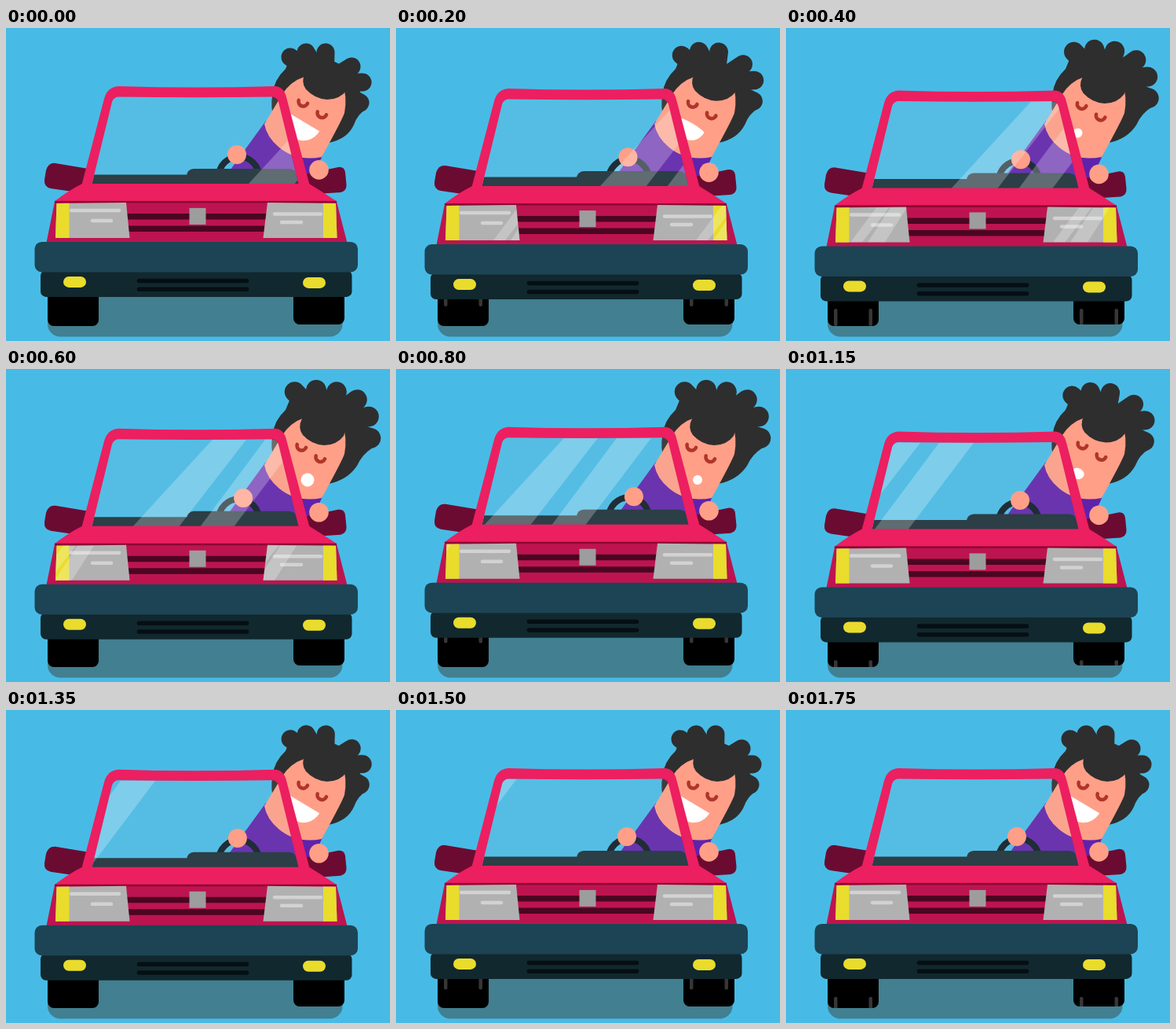
Recreate the animation shown at these times as an HTML page with a canvas. Size 489 by 398 pixels, loop 1.8 s.

```html
<!DOCTYPE html>
<html>
<head>
<meta charset="utf-8">
<style>
html, body { margin: 0; width: 100%; height: 100%; overflow: hidden; background: #47bbe6; }
canvas { display: block; }
</style>
</head>
<body>
<canvas id="stage" width="489" height="398"></canvas>
<script>
const c = document.getElementById('stage').getContext('2d');
const LOOP = 1800, STEP = 50;
const PINK = '#ec1f60', SKIN = '#ff9f88', HAIR = '#2e2e2e', YELLOW = '#e9dc2d', PURPLE = '#5f22ab';

const mix = (a, b, k) => a + (b - a) * k;

// Cosine ease from 0 to 1 between two times
function ramp(t, from, to) {
  const k = Math.min(1, Math.max(0, (t - from) / (to - from)));
  return (1 - Math.cos(Math.PI * k)) / 2;
}

function fill(d, color) {
  c.fillStyle = color;
  c.fill(new Path2D(d));
}

function box(x, y, w, h, r, color) {
  c.fillStyle = color;
  c.beginPath();
  c.roundRect(x, y, w, h, r);
  c.fill();
}

function disc(x, y, r, color) {
  c.fillStyle = color;
  c.beginPath();
  c.arc(x, y, r, 0, Math.PI * 2);
  c.fill();
}

function line(x1, y1, x2, y2, w, color) {
  c.strokeStyle = color;
  c.lineWidth = w;
  c.lineCap = 'round';
  c.beginPath();
  c.moveTo(x1, y1);
  c.lineTo(x2, y2);
  c.stroke();
}

// Slanted band of light: bottom edge a..b, top edge e..f
function band(a, b, y1, e, f, y2, shift) {
  c.fillStyle = 'rgba(255,255,255,0.24)';
  c.beginPath();
  c.moveTo(a + shift, y1);
  c.lineTo(b + shift, y1);
  c.lineTo(f + shift, y2);
  c.lineTo(e + shift, y2);
  c.fill();
}

const GLASS = 'M109 200 L135 94 Q137 88 143 87.5 Q241 89 339 87.5 Q345 88 347 94 L373 200 Z';
const FRAME = 'M96 201 L125 90 Q129 75 143 74 Q240 77 343 74 Q354 75 357 88 L387 201 Z ';
const LAMP_L = 'M64.5 223 L153 222 L157.5 267 L63 267 Z';
const LAMP_R = 'M333 222 L420 223 L421.5 267 L327.5 267 Z';

// Tuft tips: rest x, y and blown x, y
const TUFTS = [
  [362, 37, 367.5, 29], [382, 31, 395, 26.5], [407, 31, 421, 29],
  [440, 49, 447, 39], [454, 69, 462, 60.5], [451, 95, 464.5, 88]
];

function wheels(n) {
  const top = 307 + (6.25 * n) % 80.5;
  for (const [x, h] of [[53, 39], [366, 37]]) {
    box(x, 340, 65, h, [0, 0, 8, 8], '#000');
    c.save();
    c.beginPath();
    c.rect(x, 340, 65, h);
    c.clip();
    for (const dx of [8, 52.5]) box(x + dx, top, 4.5, 22, 2, '#363636');
    c.restore();
  }
}

function mouth(t) {
  const s = 1 - ramp(t, 100, 350) + ramp(t, 1100, 1350);
  const side = ramp(t, 400, 600) - ramp(t, 850, 1100);
  const r = 6 + 2.5 * (1 - Math.cos(2 * Math.PI * (t - 400) / 400)) / 2;
  const rx = mix(r, 23, s), up = mix(r, 0, s), down = mix(r, 24, s);
  c.save();
  c.translate(mix(mix(371.5, 384, side), 379.5, s), mix(mix(133.5, 141, side), 119.5, s));
  c.rotate(0.54);
  c.fillStyle = '#fff';
  c.beginPath();
  c.ellipse(0, 0, rx, down, 0, 0, Math.PI);
  c.ellipse(0, 0, rx, up, 0, Math.PI, Math.PI * 2);
  c.fill();
  c.restore();
}

function driver(t) {
  const u = ramp(t, 0, 550) - ramp(t, 850, 1400);

  fill('M331 118 L283 184 L300 205 L384 205 L403 162 Z', PURPLE);

  // Back hair
  for (const [x, y, bx, by] of TUFTS) {
    line(406, 70, mix(x, bx, u), mix(y, by, u), mix(23, 25.5, u), HAIR);
  }
  fill(`M361 40 L356 52 Q341 66 339.5 84 Q336 100 342 118 L362 100 L405 120 L411 146
    Q435 141 ${443 + 4 * u} 123 Q${448 + 5 * u} 109 ${458 + 9 * u} ${104 - 4 * u} L444 60 L405 42 Z`, HAIR);

  fill('M329 122 L352 84 Q362 68 380 62 L428 68 Q435 88 431 108 Q428 117 402 164 Q370 170 348 152 Q332 139 329 122 Z', SKIN);

  // Fringe
  c.save();
  c.translate(-4 * u, 6 * u);
  fill('M381 57 Q375 69 382 78 Q393 90 409 91 Q425 91 434 79 L442 54 L408 38 Z', HAIR);
  c.restore();

  c.strokeStyle = '#b0352a';
  c.lineWidth = 4.6;
  c.lineCap = 'round';
  for (const [x, y] of [[378.5, 93.5], [402.5, 108]]) {
    c.beginPath();
    c.arc(x - 2 * u, y + 4 * u, 6, 0.4, 3.4);
    c.stroke();
  }
  mouth(t);
}

function mirrors() {
  fill('M105 179 L63 172 Q54 171 51 181 L49 193 Q48 202 57 204 L105 211 Z', '#6c0b31');
  fill('M380 186 L423 177 Q431 176 432 184 L433.5 199 Q434 207 426 209 L380 212 Z', '#6c0b31');
}

function cabin(t, shift) {
  const turn = t < 1500 ? (1 - Math.cos(2 * Math.PI * t / 1500)) / 2 : 0;
  c.save();
  c.clip(new Path2D(GLASS));
  c.fillStyle = 'rgba(200,200,200,0.1)';
  c.fillRect(90, 80, 300, 125);
  c.strokeStyle = '#1f2d36';
  c.lineWidth = 8;
  c.beginPath();
  c.arc(296.5, 189, 25.5, Math.PI, Math.PI * 2);
  c.stroke();
  box(100, 186.5, 280, 20, 0, '#2c3e46');
  box(230, 179, 140, 25, 9, '#2c3e46');
  disc(294 + 9 * turn, 161 + 1.5 * turn, 12, SKIN);
  band(112, 171, 199, 214, 257, 88, shift);
  band(198, 241, 199, 281, 325, 88, shift);
  c.restore();
  c.fillStyle = PINK;
  c.fill(new Path2D(FRAME + GLASS), 'evenodd');
}

function lamp(path, yellowX, x, shift) {
  c.save();
  c.clip(new Path2D(path));
  c.fillStyle = '#b1b1b1';
  c.fillRect(50, 220, 380, 50);
  c.fillStyle = YELLOW;
  c.fillRect(yellowX, 220, 18, 50);
  if (yellowX < 200) {
    line(83, 232, 144, 232, 4.5, '#d2d2d2');
    line(110, 245, 134, 245, 4.5, '#d2d2d2');
  } else {
    line(342, 236.5, 401, 236.5, 4.5, '#d2d2d2');
    line(351, 247, 376, 247, 4.5, '#d2d2d2');
  }
  band(x, x + 15, 267, x + 33, x + 49, 223, shift);
  band(x + 22, x + 44, 267, x + 51, x + 72, 223, shift);
  c.restore();
}

function front(shift) {
  fill('M62 221 L421 221 L435 275 L51 275 Z', '#bd1450');
  fill('M97 198 L386 198 Q404 209 422 221 L61 221 Q79 207 97 198 Z', PINK);
  c.fillStyle = '#8d0632';
  c.fillRect(62, 220, 359, 2.5);
  box(154, 236, 178, 7.5, 0, '#4b0621');
  box(156, 251.5, 174, 7.5, 0, '#4b0621');
  box(233.5, 229, 21, 21, 0, '#9d9d9d');
  lamp(LAMP_L, 62.5, 82, shift);
  lamp(LAMP_R, 404, 340, shift);

  box(44, 308, 396.5, 34, 7, '#11282e');
  box(36.5, 272, 411.5, 38.5, 9, '#1c4454');
  box(73, 316, 29, 14, 7, YELLOW);
  box(378, 317, 29, 14, 7, YELLOW);
  line(169.5, 321.5, 306.5, 321.5, 5.5, '#050f13');
  line(169.5, 332.3, 306.5, 332.3, 5.5, '#050f13');
}

function draw(t) {
  const n = t / STEP;
  const swing = (1 + Math.cos(2 * Math.PI * (n - 3.15) / 5)) / 2;
  const bounce = -0.3 + 5.8 * Math.pow(swing, 1.8);

  c.fillStyle = '#47bbe6';
  c.fillRect(0, 0, 489, 398);
  box(53, 335, 375.5, 57.5, 16, '#417f91');
  wheels(n);
  driver(t);

  c.save();
  c.translate(0, bounce);
  mirrors();
  cabin(t, (800 - t) * 0.245);
  front((400 - t) * 0.21);
  disc(398.5, 180.5, 12.3, SKIN);
  c.restore();
}

function tick() {
  const t = performance.now() % LOOP;
  draw(Math.floor(t / STEP) * STEP);
  requestAnimationFrame(tick);
}
tick();
</script>
</body>
</html>
```
